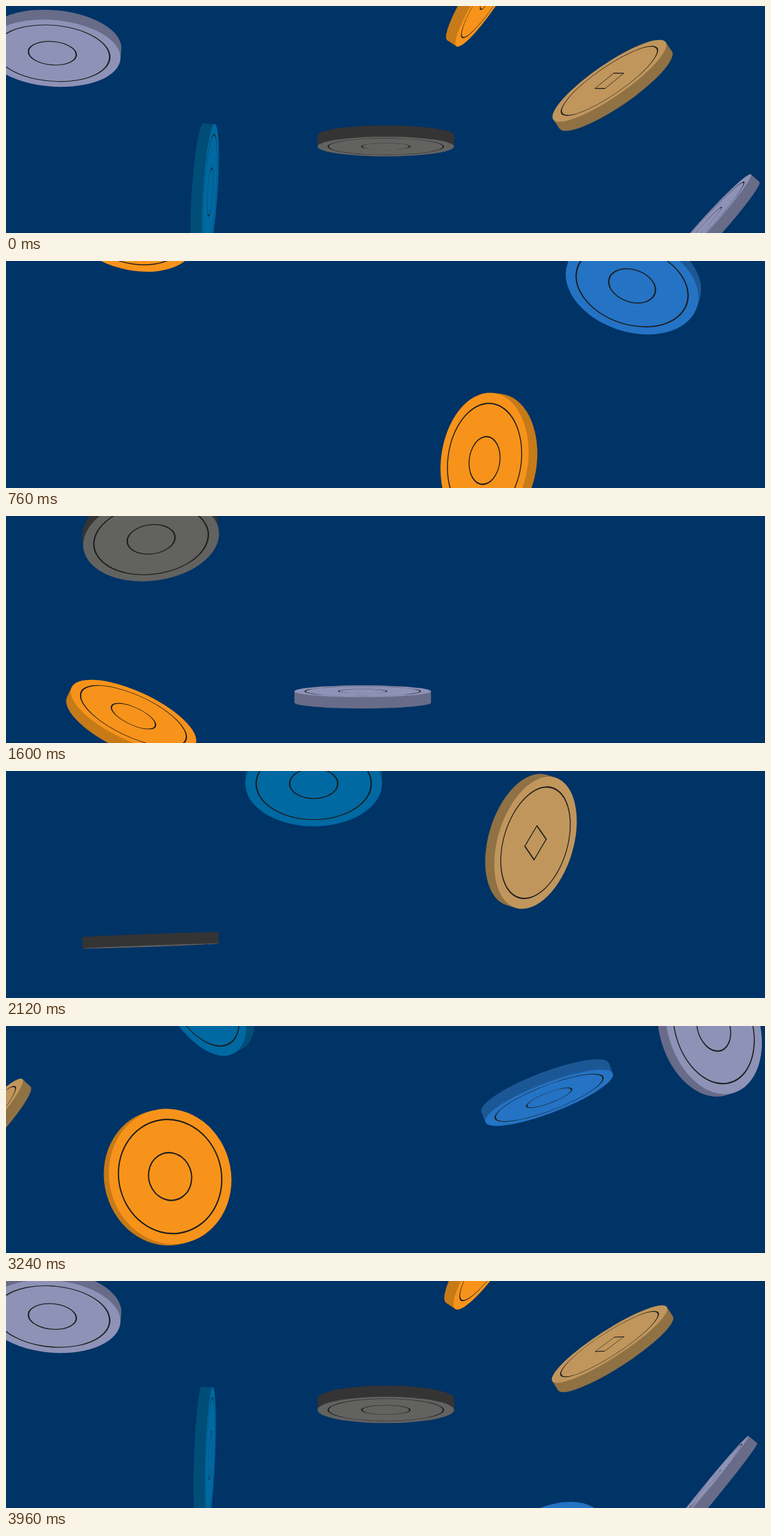
An HTML page with a canvas for the animation above (4 s loop, 1200 px wide and 360 px high).

```html
<!DOCTYPE html>
<html lang="en">
<head>
<meta charset="utf-8">
<title>Falling coins</title>
<style>
  html, body { margin: 0; height: 100%; overflow: hidden; background: #003366; }
  canvas { display: block; }
</style>
</head>
<body>
<canvas id="stage" width="1200" height="360"></canvas>
<script>
const ctx = document.getElementById('stage').getContext('2d');
const LOOP = 4000, FALL = 0.459, SPIN = 0.0715;   // ms, px per ms, degrees per ms
const RADIUS = 108, RING = 91, MARK = 38, HOLE = 40, HALF_EDGE = 9;
const RAD = Math.PI / 180;

// face colour, edge colour
const lavender = ['#8e92b6', '#686c88'];
const orange = ['#f7931a', '#c67a18'];
const tan = ['#c0965c', '#8f7144'];
const gray = ['#626261', '#343434'];
const teal = ['#0069a2', '#004d78'];
const blue = ['#2473c4', '#1c5795'];

// colours, x, time at mid height, delay until seen edge-on,
// heading and slope of the spin plane in degrees, spin speed
const coins = [
  [lavender, 74, 247, 166, 91, -97],
  [lavender, 564, 1368, 164, 90, -90],
  [lavender, 1112.5, 3623, 302, 217, 48, 0.094],
  [gray, 600.5, 3927, 190, 90, -90],
  [gray, 228.5, 1928, 202, 88, -83],
  [orange, 763.5, 462, -317, 28.7, -113.6],
  [orange, 198, 1285, 16, -68, 82.5],
  [orange, 255.5, 3111, -515, -75, 66, 0.12],
  [tan, 959, 119, -354, 245, 124],
  [tan, 1248, 2636, -556, 260, 124],
  [tan, 830, 2270, 330, 190, 100],
  [tan, -41, 3264, -154, 226, 110],
  [teal, 314, 3752, 130, -1, 52, 0.065],
  [teal, 486.5, 2485, 180, 90, -90],
  [blue, 992, 1081, 279, 102, -97],
  [blue, 855.5, 3403, 19, 246.6, 100.4],
];

function circle(r) {
  ctx.beginPath();
  ctx.arc(0, 0, r, 0, 2 * Math.PI);
}

function drawCoin(time, [colors, x, midTime, edgeDelay, heading, slope, spin = SPIN]) {
  const dt = (time - midTime + 1.5 * LOOP) % LOOP - LOOP / 2;
  const y = 180 + FALL * dt;
  if (y < -120 || y > 480) return;

  const angle = spin * (dt - edgeDelay) * RAD;
  const c = Math.cos(angle), s = Math.sin(angle);
  const ux = Math.cos(heading * RAD), uy = Math.sin(heading * RAD);
  const flat = Math.cos(slope * RAD), steep = Math.sin(slope * RAD);
  const wx = -uy * flat, wy = ux * flat;

  // Normal of the visible face, and the two axes lying in that face
  const side = steep * s < 0 ? -1 : 1;
  const nx = side * (ux * c + wx * s), ny = side * (uy * c + wy * s);
  const kx = uy * steep, ky = -ux * steep;
  const mx = side * (ux * s - wx * c), my = side * (uy * s - wy * c);

  // Draws in the plane of the disc, shifted along its normal
  const onDisc = (offset, draw) => {
    ctx.save();
    ctx.transform(kx, ky, mx, my, x + offset * nx, y + offset * ny);
    draw();
    ctx.restore();
  };

  ctx.fillStyle = colors[1];
  onDisc(-HALF_EDGE, () => { circle(RADIUS); ctx.fill(); });
  const depth = HALF_EDGE * Math.hypot(nx, ny);
  ctx.save();
  ctx.translate(x, y);
  ctx.rotate(Math.atan2(ny, nx));
  ctx.fillRect(-depth, -RADIUS, 2 * depth, 2 * RADIUS);
  ctx.restore();

  ctx.fillStyle = colors[0];
  onDisc(HALF_EDGE, () => {
    circle(RADIUS);
    ctx.fill();
    circle(RING);
    ctx.stroke();
    if (colors === tan) {
      ctx.rotate(36 * RAD);
      ctx.strokeRect(-HOLE / 2, -HOLE / 2, HOLE, HOLE);
    } else {
      circle(MARK);
      ctx.stroke();
    }
  });
}

function frame() {
  const time = performance.now() % LOOP;
  ctx.fillStyle = '#003366';
  ctx.fillRect(0, 0, 1200, 360);
  ctx.strokeStyle = '#1c1c1c';
  ctx.lineWidth = 2.2;
  coins.forEach(coin => drawCoin(time, coin));
  requestAnimationFrame(frame);
}
frame();
</script>
</body>
</html>
```
